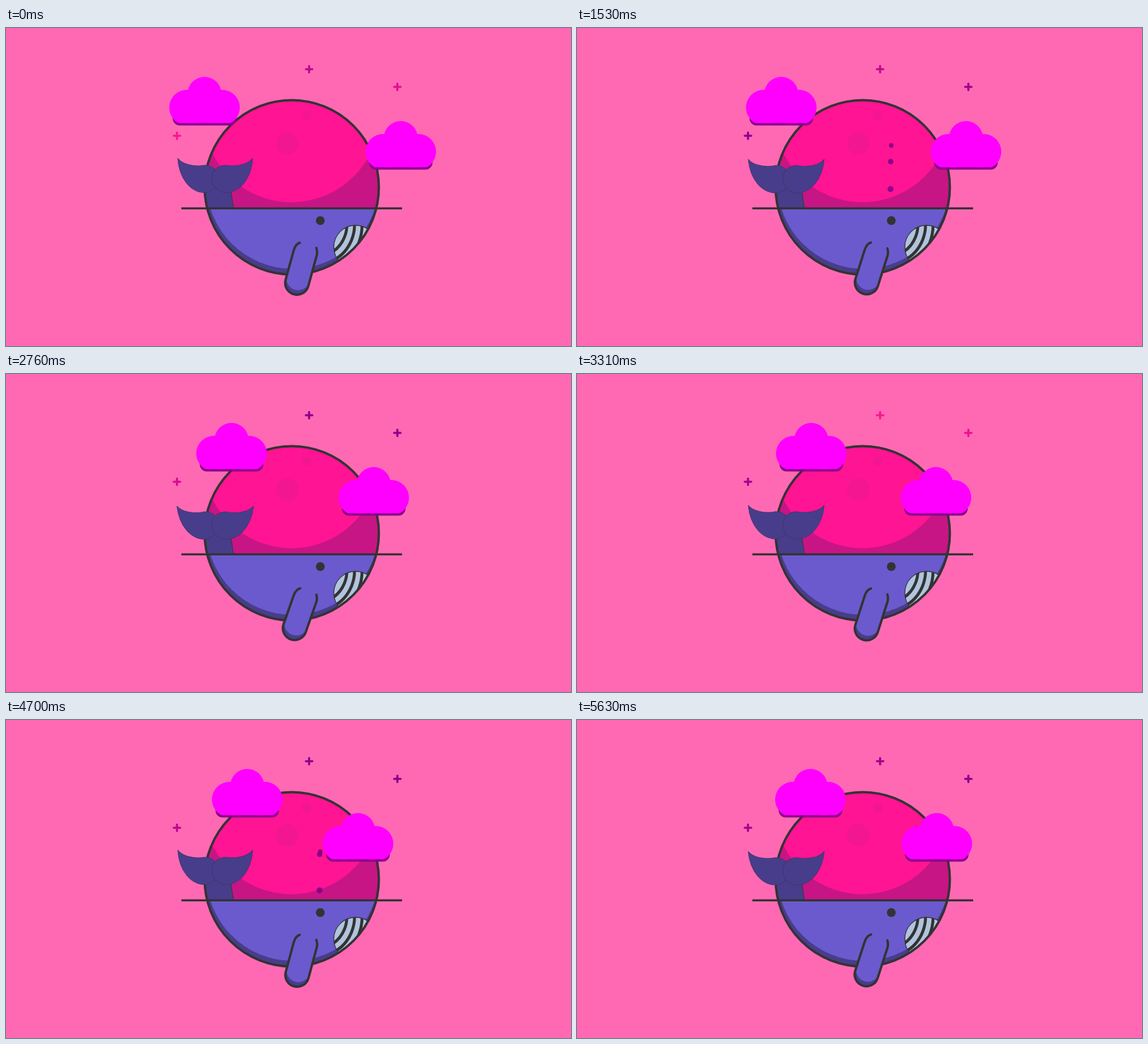
Recreate the animation shown at these times as an HTML page with a canvas. Size 960 px wide and 540 px high, loop 5.67 s.

```html
<!DOCTYPE html>
<html lang="en">
<head>
<meta charset="utf-8">
<title>Whale globe</title>
<style>
html, body { margin: 0; width: 100%; height: 100%; overflow: hidden; background: hotpink; }
canvas { display: block; }
</style>
</head>
<body>
<canvas id="stage" width="960" height="540"></canvas>
<script>
const ctx = document.getElementById('stage').getContext('2d');
const LOOP = 5670, START = 440, TAU = Math.PI * 2, DEG = Math.PI / 180;
const INK = '#333', BODY = 'slateblue', SHADE = 'darkslateblue';
const GLOBE = { x: 485.5, y: 270.5, r: 148 };
const WATER = 306;

// cubic-bezier(.42, 0, .58, 1), solved by bisection
function ease(u) {
  let lo = 0, hi = 1, s = 0.5;
  for (let i = 0; i < 22; i++) {
    s = (lo + hi) / 2;
    const x = 1.26 * (1 - s) * (1 - s) * s + 1.74 * (1 - s) * s * s + s * s * s;
    if (x < u) lo = s; else hi = s;
  }
  return s * s * (3 - 2 * s);
}

// Eased 0 to 1 and back, each way lasting half
function swing(t, half) {
  const u = ((t / half) % 2 + 2) % 2;
  return ease(u < 1 ? u : 2 - u);
}

function disc(x, y, r, fill) {
  ctx.beginPath();
  ctx.arc(x, y, r, 0, TAU);
  ctx.fillStyle = fill;
  ctx.fill();
}

function group(draw) {
  ctx.save();
  draw();
  ctx.restore();
}

function clipBox(x, y, w, h) {
  ctx.beginPath();
  ctx.rect(x, y, w, h);
  ctx.clip();
}

function clipDisc(x, y, r) {
  ctx.beginPath();
  ctx.arc(x, y, r, 0, TAU);
  ctx.clip();
}

const pluses = [
  { x: 515, y: 70, peak: 270 },
  { x: 665, y: 100, peak: 175 },
  { x: 290.5, y: 183, peak: -30 }
];

// Blinks between dark magenta and deep pink once a second
function drawPlus(p, t) {
  const k = swing(t - p.peak + 500, 500);
  ctx.strokeStyle = `rgb(${139 + 116 * k}, ${20 * k}, ${139 + 8 * k})`;
  ctx.lineWidth = 3.6;
  ctx.lineCap = 'round';
  ctx.beginPath();
  ctx.moveTo(p.x - 5.5, p.y);
  ctx.lineTo(p.x + 5.5, p.y);
  ctx.moveTo(p.x, p.y - 5.5);
  ctx.lineTo(p.x, p.y + 5.5);
  ctx.stroke();
}

function drawUpper() {
  group(() => {
    clipBox(0, 0, 960, WATER);
    clipDisc(GLOBE.x, GLOBE.y, GLOBE.r);
    ctx.fillStyle = 'mediumvioletred';
    ctx.fillRect(330, 110, 320, 200);
    disc(485, 146, 150, 'deeppink');
    disc(478, 196, 19, '#f21691');
    disc(511, 148, 8, '#f21691');
    ctx.fillStyle = SHADE;
    ctx.beginPath();
    ctx.moveTo(330, 262);
    ctx.lineTo(380, 262);
    ctx.quadraticCurveTo(384, 290, 386.5, WATER);
    ctx.lineTo(330, WATER);
    ctx.fill();
    ctx.strokeStyle = INK;
    ctx.lineWidth = 1;
    ctx.beginPath();
    ctx.moveTo(380, 262);
    ctx.quadraticCurveTo(384, 290, 386.5, WATER);
    ctx.stroke();
  });
}

function drawMouth() {
  const x = 594, y = 372, r = 37;
  disc(x, y, r, 'lightsteelblue');
  group(() => {
    clipDisc(x, y, r);
    ctx.strokeStyle = INK;
    ctx.lineWidth = 5;
    for (const reach of [54, 67, 80]) {
      ctx.beginPath();
      ctx.arc(525, 335, reach, -0.4, 1.5);
      ctx.stroke();
    }
  });
  ctx.strokeStyle = INK;
  ctx.lineWidth = 1.3;
  ctx.beginPath();
  ctx.arc(x, y, r, 0, TAU);
  ctx.stroke();
}

function drawLower() {
  group(() => {
    clipBox(0, WATER, 960, 234);
    clipDisc(GLOBE.x, GLOBE.y, GLOBE.r);
    ctx.fillStyle = SHADE;
    ctx.fillRect(330, WATER, 320, 120);
    disc(487, 262.5, 146.5, BODY);
    drawMouth();
  });
  disc(534, 327, 7.5, INK);
}

function drawRim() {
  ctx.lineWidth = 4;
  ctx.strokeStyle = INK;
  ctx.beginPath();
  ctx.arc(GLOBE.x, GLOBE.y, GLOBE.r, 0, TAU);
  ctx.stroke();
}

// Right fluke; the left one is its mirror image about the tail axis
function drawFluke(side, p) {
  group(() => {
    ctx.translate(355.5, 0);
    ctx.scale(side, 1);
    ctx.translate(-2.5, 255);
    ctx.rotate(2.9 * DEG * p);
    ctx.translate(2.5, -255);
    ctx.beginPath();
    ctx.moveTo(63.5, 221);
    ctx.bezierCurveTo(55.5, 232, 33.5, 236, 17.5, 233);
    ctx.bezierCurveTo(0, 234, -5.5, 246, -5.5, 256);
    ctx.bezierCurveTo(-5.5, 270, 6.5, 279.5, 19.5, 279.5);
    ctx.bezierCurveTo(42.5, 278, 61.5, 255, 63.5, 221);
    ctx.fillStyle = SHADE;
    ctx.fill();
    ctx.strokeStyle = '#3d3768';
    ctx.lineWidth = 1;
    ctx.stroke();
  });
}

function finPath() {
  ctx.beginPath();
  ctx.moveTo(-13.5, -8);
  ctx.quadraticCurveTo(-20, -4, -20, 8);
  ctx.lineTo(-20, 59);
  ctx.arc(0, 59, 20, Math.PI, 0, true);
  ctx.lineTo(20, 5);
  ctx.quadraticCurveTo(20, -1, 16, -7);
}

function drawFin(p) {
  group(() => {
    ctx.translate(510, 376);
    ctx.rotate((14.9 + 4.7 * p) * DEG);
    group(() => {
      finPath();
      ctx.clip();
      ctx.fillStyle = SHADE;
      ctx.fillRect(-22, 40, 44, 45);
      ctx.translate(0, -8);
      finPath();
      ctx.fillStyle = BODY;
      ctx.fill();
    });
    finPath();
    ctx.strokeStyle = INK;
    ctx.lineWidth = 4;
    ctx.lineCap = 'round';
    ctx.stroke();
  });
}

const drops = [
  { x: 532.7, r: 5, top: 259.5, base: 317, peak: 1190 },
  { x: 533, r: 4.6, top: 226, base: 322, peak: 1600 },
  { x: 534, r: 3.8, top: 191.6, base: 323.6, peak: 1360 }
];

// Each drop rises for a second, falls for a second, then rests for one
function drawDrops(t) {
  group(() => {
    clipBox(0, 0, 960, WATER);
    for (const d of drops) {
      const since = ((t - d.peak + 1500) % 3000 + 3000) % 3000 - 1500;
      const lift = ease(Math.max(0, 1 - Math.abs(since) / 1000));
      disc(d.x, d.base + (d.top - d.base) * lift, d.r, 'darkmagenta');
    }
  });
}

function drawCloud(x, y) {
  ctx.fillStyle = 'darkmagenta';
  ctx.beginPath();
  ctx.roundRect(x - 54, y + 57, 108, 25.5, 12);
  ctx.fill();
  group(() => {
    clipBox(x - 70, y - 5, 140, 83.5);
    disc(x, y + 29, 29, 'magenta');
    disc(x - 30, y + 52, 30, 'magenta');
    disc(x + 30, y + 52, 30, 'magenta');
    ctx.fillRect(x - 30, y + 40, 60, 40);
  });
}

function render(t) {
  const drift = swing(t - START, 4000), sway = swing(t - START, 2000);
  ctx.fillStyle = 'hotpink';
  ctx.fillRect(0, 0, 960, 540);
  for (const p of pluses) drawPlus(p, t);
  drawUpper();
  drawLower();
  drawRim();
  drawFluke(-1, sway);
  drawFluke(1, sway);
  drawDrops(t);
  drawFin(sway);
  ctx.fillStyle = INK;
  ctx.fillRect(298, WATER - 1.5, 375, 3.5);
  const x = 335.5 + 75 * drift;
  drawCloud(x, 83);
  drawCloud(1008 - x, 158);
}

function tick() {
  render(performance.now() % LOOP);
  requestAnimationFrame(tick);
}
tick();
</script>
</body>
</html>
```
